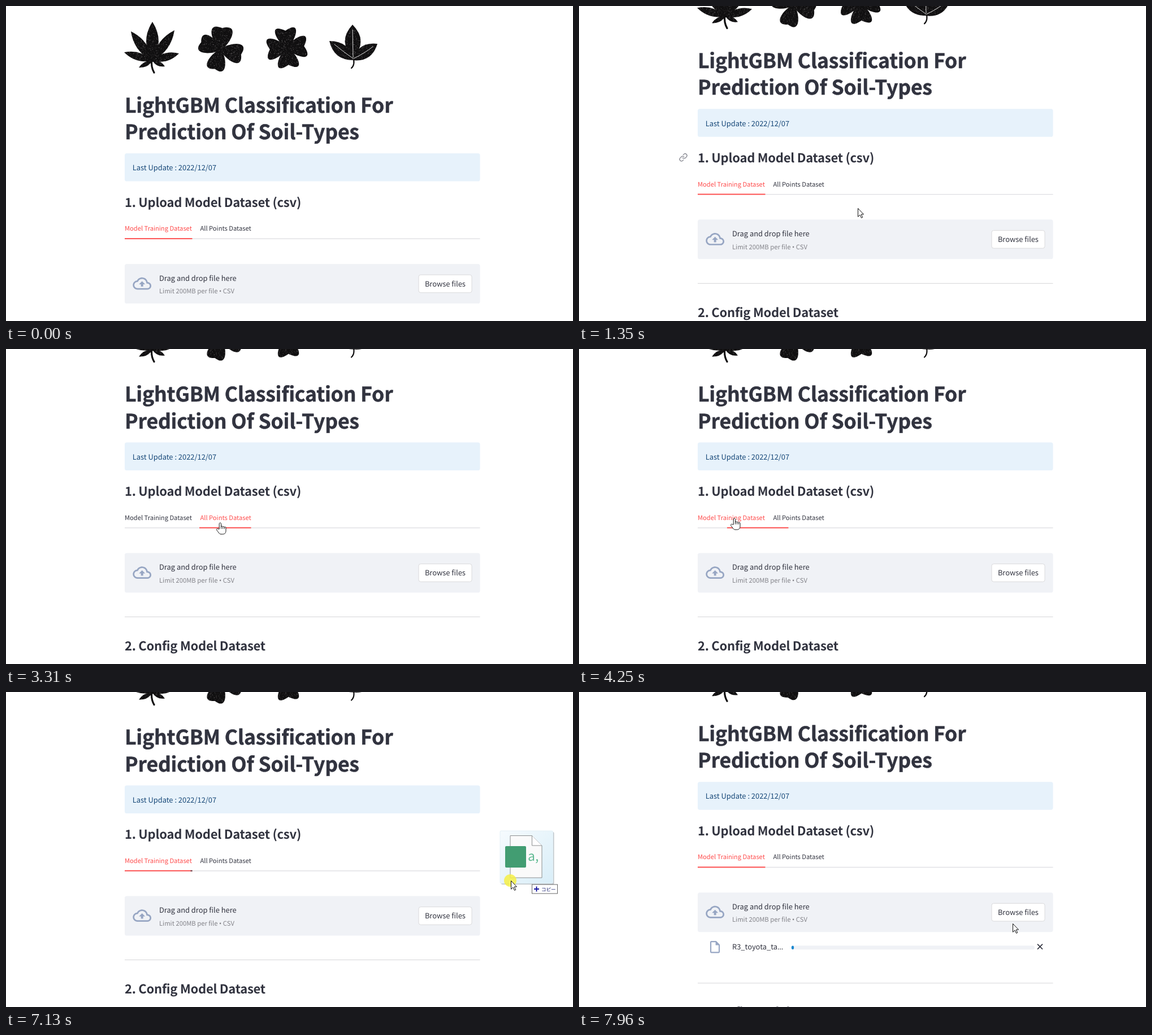
An HTML page for the animation above (8000 ms loop, 1003 by 558 pixels).

```html
<!DOCTYPE html>
<html lang="en">
<head>
<meta charset="utf-8">
<title>LightGBM Classification</title>
<style>
  html, body { margin: 0; width: 100%; height: 100%; overflow: hidden; background: #fff; }
  svg { display: block; width: 1003px; height: 558px; }
  text { font-family: "Noto Sans CJK JP", "Noto Sans CJK", "Noto Sans", sans-serif;
         font-size: 12.88px; fill: #31333f; text-rendering: geometricPrecision; white-space: pre; }
  .title { font-size: 35.55px; font-weight: 700; letter-spacing: -.18px; stroke: #31333f; stroke-width: .5px; }
  .heading { font-size: 22px; font-weight: 600; letter-spacing: -.25px; }
  .tab { font-size: 11.15px; }
  .hint { font-size: 11.25px; fill: #838389; }
  .rule { fill: #d6d6d9; }
  .panel { fill: #f0f2f6; }
  .icon { fill: #97a6c3; }
</style>
</head>
<body>
<svg viewBox="0 0 1003 558" xmlns="http://www.w3.org/2000/svg">
  <defs>
    <pattern id="grain" width="83" height="71" patternUnits="userSpaceOnUse">
      <rect width="83" height="71" fill="#100f10"/>
    </pattern>
    <linearGradient id="glass" x2="1" y2="1">
      <stop offset="0" stop-color="#f6fbfe"/><stop offset="1" stop-color="#d9eef8"/>
    </linearGradient>
  </defs>

  <g id="page">
    <g id="leaves" fill="url(#grain)"></g>

    <text class="title" x="210" y="188.7">LightGBM Classification For</text>
    <text class="title" x="210" y="236">Prediction Of Soil-Types</text>

    <rect x="210" y="261" width="628.5" height="49.5" rx="3.6" fill="#e7f2fb"/>
    <text x="223.7" y="291.2" style="fill:#174878">Last Update : 2022/12/07</text>

    <g id="link" transform="translate(176.7 339) scale(.65)" fill="none" stroke="#888992" stroke-width="2" stroke-linecap="round">
      <path d="M10 13a5 5 0 0 0 7.54.54l3-3a5 5 0 0 0-7.07-7.07l-1.72 1.71"/>
      <path d="M14 11a5 5 0 0 0-7.54-.54l-3 3a5 5 0 0 0 7.07 7.07l1.71-1.71"/>
    </g>
    <text class="heading" x="210" y="355.5">1. Upload Model Dataset (csv)</text>

    <text class="tab" id="tab1" x="210" y="398.3">Model Training Dataset</text>
    <text class="tab" id="tab2" x="343.5" y="398.3">All Points Dataset</text>
    <rect x="210" y="411.6" width="628.5" height="1.4" fill="#e0e0e4"/>
    <rect id="underline" y="411.2" height="1.9" fill="#ff4b4b"/>
    <rect id="stub" x="326.5" y="411.4" width="3" height="1.7" fill="#4a3a45"/>

    <rect class="panel" x="210" y="457" width="628.5" height="70" rx="3.6"/>
    <path class="icon" transform="translate(224.3 475.2) scale(1.365)" d="M19.35 10.04C18.67 6.59 15.64 4 12 4 9.11 4 6.6 5.64 5.35 8.04 2.34 8.36 0 10.91 0 14c0 3.31 2.69 6 6 6h13c2.76 0 5-2.24 5-5 0-2.64-2.05-4.78-4.65-4.96zM19 18H6c-2.21 0-4-1.79-4-4 0-2.05 1.53-3.76 3.56-3.97l1.07-.11.5-.95C8.08 7.14 9.94 6 12 6c2.62 0 4.88 1.86 5.39 4.43l.3 1.5 1.53.11c1.56.1 2.78 1.41 2.78 2.96 0 1.65-1.35 3-3 3zM8 13h2.55v3h2.9v-3H16l-4-4z"/>
    <text x="271" y="486.6">Drag and drop file here</text>
    <text class="hint" x="271" y="509.2">Limit 200MB per file <tspan font-family="Noto Sans, sans-serif">•</tspan> CSV</text>
    <rect x="730" y="476.2" width="94" height="31.6" rx="3.6" fill="#fff" stroke="#d6d6d9" stroke-width=".9"/>
    <text x="740.9" y="496.6">Browse files</text>

    <g id="upload">
      <path class="icon" transform="translate(227.7 540.7) scale(1.07)" d="M14 2H6c-1.1 0-2 .9-2 2v16c0 1.1.9 2 2 2h12c1.1 0 2-.9 2-2V8l-6-6zM6 20V4h7v5h5v11H6z"/>
      <text x="271" y="557.8">R3_toyota_ta<tspan font-family="Noto Sans, sans-serif">…</tspan></text>
      <rect class="panel" x="376" y="551" width="430" height="7" rx="3.5"/>
      <ellipse cx="378" cy="554.5" rx="2.2" ry="3.2" fill="#1c88cf"/>
      <path d="M811 548.4l9 9m0-9l-9 9" stroke="#31333f" stroke-width="1.6"/>
    </g>

    <g id="below">
      <rect class="rule" x="210" y="569.5" width="628.5" height="1"/>
      <text class="heading" x="210" y="629.6">2. Config Model Dataset</text>
    </g>
  </g>

  <g id="pointer">
    <g id="dragged">
      <rect x="-17" y="-86" width="93.5" height="93" rx="2" fill="#8d9aa2" opacity=".55"/>
      <rect x="-19" y="-88" width="93.5" height="93" rx="2" fill="url(#glass)" stroke="#e3f0f6"/>
      <path d="M-1-79.5H37.5L55-62V-5H-1z" fill="#fafafa" stroke="#8c8f90"/>
      <path d="M37.5-79.5V-62H55" fill="#fff" stroke="#8c8f90"/>
      <rect x="-10" y="-61" width="37" height="38" rx="2" fill="#429d72"/>
      <text x="30" y="-35" style="font-size:23px;fill:#62bb94">a,</text>
      <rect x="37.5" y="7" width="45" height="16" fill="#fff" stroke="#666"/>
      <path d="M41 15h9m-4.5-4.5v9" stroke="#1616a0" stroke-width="2"/>
      <text x="54" y="18.6" style="font-size:8.5px;fill:#1c2470">コピー</text>
    </g>
    <circle id="press" cx="-1" r="11" fill="#f4ee45" opacity=".85"/>
    <path id="arrow" d="M.5.5V15.300L4 12l2.500 5.400 2.200-1L6.200 11H10.500z" fill="#fff" stroke="#111"/>
    <path id="hand" d="M-1.800 11V1.700C-1.800-.6 1.600-.6 1.600 1.700V7c0-1.500 3-1.500 3 .3 0-1.300 2.800-1.200 2.800.6 0-1.200 2.600-1 2.600.9v5c0 4-2 6.200-5.500 6.200H1C-1.500 20-3 17-6.200 12.800c-1.200-2 1-3.400 2.800-1.900zM1.600 7v3.500M4.600 7.500v3M7.400 8v2.600" fill="#fff" stroke="#111"/>
  </g>
</svg>
<script>
const LOOP = 8000;
const $ = id => document.getElementById(id);
const svgNode = (parent, tag, attrs) => {
  const node = document.createElementNS('http://www.w3.org/2000/svg', tag);
  for (const key in attrs) node.setAttribute(key, attrs[key]);
  return parent.appendChild(node);
};

// Leaf stamps
const leaves = $('leaves');
const blob = (cx, cy, rx, ry = rx) => svgNode(leaves, 'ellipse', { cx, cy, rx, ry });
const line = (d, stroke, width) =>
  svgNode(leaves, 'path', { d, fill: 'none', stroke, 'stroke-width': width, 'stroke-linecap': 'round' });
function lobe(x, y, tipX, tipY, bulge) {
  const dx = tipX - x, dy = tipY - y, len = Math.hypot(dx, dy);
  const side = s => `${x + dx * .5 - s * dy / len * bulge} ${y + dy * .5 + s * dx / len * bulge}`;
  svgNode(leaves, 'path', { d: `M${x} ${y}Q${side(1)} ${tipX} ${tipY}Q${side(-1)} ${x} ${y}z` });
}
// Rounded petal; a notch turns it into a heart
function petal(x, y, degrees, length, width, notch) {
  const angle = degrees * Math.PI / 180, cos = Math.cos(angle), sin = Math.sin(angle);
  const at = (along, across) => {
    const u = along * length, v = across * width;
    return `${x + u * cos - v * sin} ${y + u * sin + v * cos}`;
  };
  const end = at(1 - notch, 0);
  svgNode(leaves, 'path', {
    d: `M${at(0, 0)}C${at(.2, -.7)} ${at(1.3, -1.5)} ${end}C${at(1.3, 1.5)} ${at(.2, .7)} ${at(0, 0)}z`
  });
}

function drawLeaves() {
  let seed = 7;
  const random = () => (seed = seed * 16807 % 2147483647) / 2147483647;
  for (let i = 0; i < 900; i++)
    svgNode($('grain'), 'circle', {
      cx: random() * 83, cy: random() * 71, r: .2 + random() * .4,
      fill: '#b5b0b2', opacity: .2 + random() * .5
    });

  for (const [x, y, bulge] of [[259, 28, 22], [221, 45, 17], [298, 43, 17], [209, 82, 14],
                               [306, 84, 14], [235, 109, 8], [281, 107, 8]])
    lobe(259, 97, x, y, bulge);
  blob(259, 90, 10, 9);
  line('M258 94Q256 108 262 118', '#100f10', 3.2);

  for (const [degrees, length, width] of [[-86, 38, 22], [-160, 37, 19], [14, 37, 20], [107, 36, 19]])
    petal(380, 77, degrees, length, width, 0);
  blob(380, 77, 5);

  for (let degrees = -95; degrees < 265; degrees += 90) petal(497, 74, degrees, 38, 22, .2);
  blob(497, 74, 6);

  lobe(614, 92, 613, 33, 28);
  lobe(615, 96, 572, 62, 22);
  lobe(613, 96, 657, 67, 22);
  line('M614 90Q618 104 611 110', '#100f10', 2.2);
  line('M614 91L613 42M614 93Q598 82 581 68M615 93Q634 84 649 72', '#dcdcdc', 1);
}

// Progress of a move drawn in a fixed number of held steps
function stepped(t, start, end, steps) {
  if (t < start) return 0;
  if (t >= end) return 1;
  return Math.min(1, (Math.floor((t - start) * (steps - 1) / (end - start) + .01) + 1) / steps);
}
const smooth = p => p * p * (3 - 2 * p);
const easeOut = p => 1 - (1 - p) ** 1.32;
const mix = (a, b, p) => a + (b - a) * p;
const within = (t, a, b) => t >= a && t < b;
const show = (id, on) => $(id).setAttribute('visibility', on ? 'inherit' : 'hidden');

// start, end, steps, x, y
const pointerMoves = [
  [190, 190, 1, 775, 495],
  [260, 540, 5, 493, 358],
  [1560, 1820, 4, 494, 361],
  [1960, 2090, 3, 409, 343],
  [2160, 2560, 7, 379, 308],
  [3370, 3570, 4, 333, 303],
  [3640, 3710, 2, 275, 300],
  [4920, 5060, 3, 420, 285],
  [5130, 5200, 2, 831, 329],
  [7130, 7130, 1, 893, 334],
  [7200, 7560, 6, 742, 414],
  [7640, 7640, 1, 767, 410]
];

function pointerAt(t) {
  let x = 775, y = 495;
  for (const [start, end, steps, toX, toY] of pointerMoves) {
    const p = stepped(t, start, end, steps);
    x = mix(x, toX, p);
    y = mix(y, toY, p);
  }
  return [x, y];
}

function render(t) {
  const uploading = t >= 7960;
  const scroll = 89.3 * easeOut(stepped(t, 740, 1490, 10))
    + 6.2 * smooth(stepped(t, 2830, 3170, 6)) + (uploading ? 6.3 : 0);
  $('page').setAttribute('transform', `translate(0 ${-scroll})`);
  $('below').setAttribute('transform', `translate(0 ${uploading ? 47.5 : 0})`);
  show('upload', uploading);
  show('link', within(t, 470, 1690));

  const tabShift = smooth(stepped(t, 2830, 3170, 6)) - smooth(stepped(t, 3980, 4400, 7));
  $('underline').setAttribute('x', mix(210, 342, tabShift));
  $('underline').setAttribute('width', mix(119.5, 91.5, tabShift));
  $('tab1').style.fill = within(t, 2900, 3640) ? '' : '#ff4b4b';
  $('tab2').style.fill = within(t, 2290, 4050) ? '#ff4b4b' : '';
  show('stub', within(t, 4520, 7960));

  const dragging = within(t, 7130, 7640);
  const pointing = within(t, 2290, 4990);
  $('pointer').setAttribute('transform', `translate(${pointerAt(t)})`);
  show('pointer', within(t, 190, 5270) || t >= 7130);
  show('dragged', dragging);
  show('press', dragging || within(t, 2830, 2960) || within(t, 3980, 4120));
  show('hand', pointing);
  show('arrow', !pointing);
}

drawLeaves();
const begin = performance.now();
function tick() {
  render((performance.now() - begin) % LOOP);
  requestAnimationFrame(tick);
}
tick();
</script>
</body>
</html>
```
